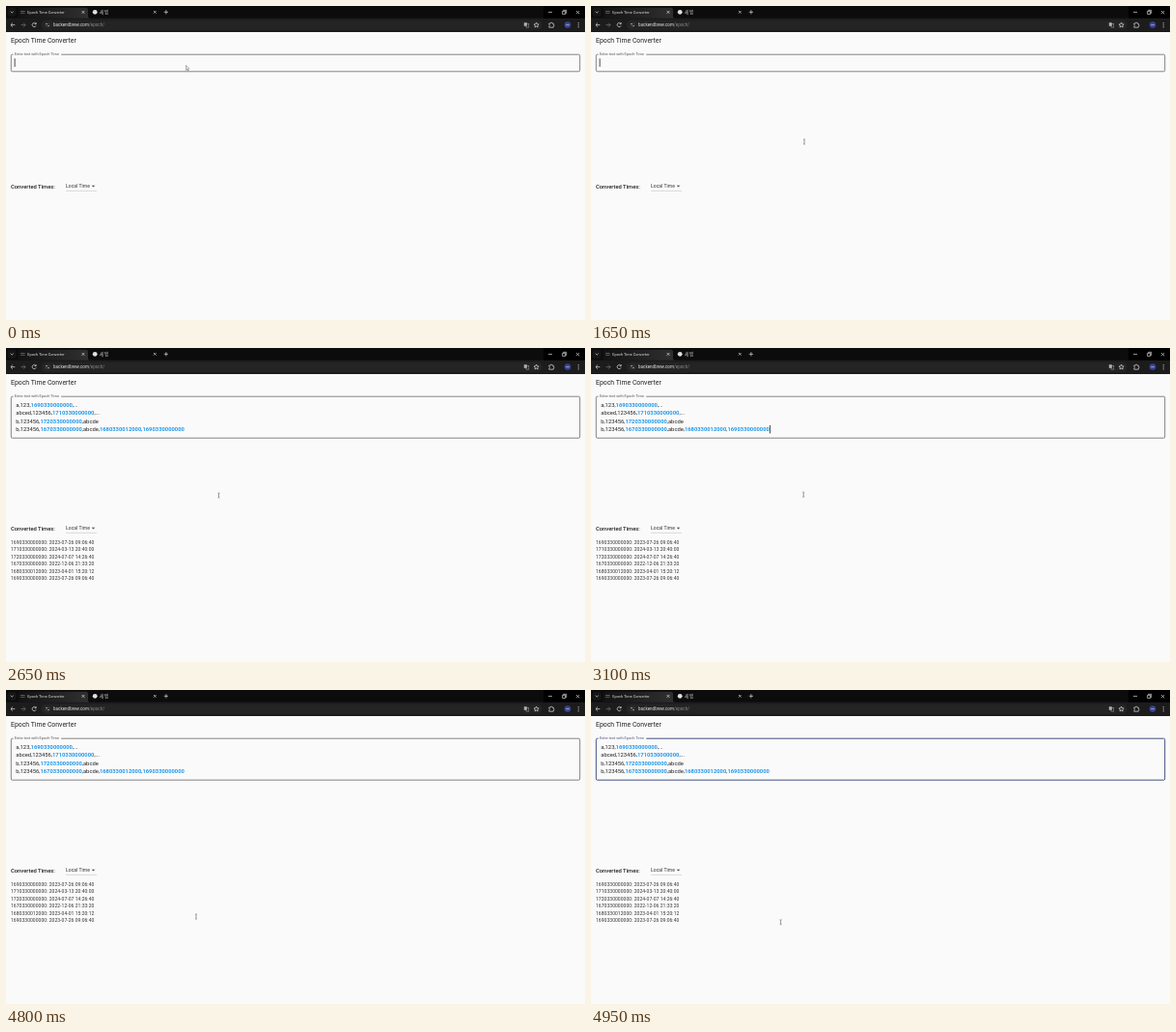
Recreate the animation shown at these times as an HTML page. Size 600x325 px, loop 5000 ms.

```html
<!DOCTYPE html>
<html lang="en">
<head>
<meta charset="utf-8">
<title>Epoch Time Converter</title>
<style>
html, body { margin: 0; width: 100%; height: 100%; overflow: hidden; background: #fbfafa; }
svg { display: block; width: 600px; height: 325px; }
text { font-family: Roboto, "Noto Sans CJK KR", "Noto Sans CJK", sans-serif; fill: #222; white-space: pre; }
.icon { fill: none; stroke: #ddd; stroke-width: .7; }
.dim { stroke: #777; }
.bar text { fill: #e4e4e4; }
.body { font-size: 5px; letter-spacing: .047px; fill: #333; }
.input { font-size: 5.82px; }
.input tspan { font-weight: 700; fill: #2098ec; }
</style>
</head>
<body>
<svg viewBox="0 0 600 325">
  <defs>
    <linearGradient id="tab"><stop stop-color="#121212"/><stop offset="1" stop-color="#303030"/></linearGradient>
  </defs>
  <rect width="600" height="325" fill="#fbfafa"/>

  <g class="bar">
    <rect width="600" height="27" fill="#1c1c1c"/>
    <rect width="600" height="12.6" fill="#0c0c0c"/>
    <rect x="557" width="43" height="12.6" fill="#000"/>
    <rect x="1.5" y="1.8" width="9" height="9" rx="2.5" fill="#161616"/>
    <path d="M11 12.8Q12.5 12.6 12.5 10.5V4Q12.5 1.8 15 1.8H82.5Q85 1.8 85 4V10.5Q85 12.6 86.5 12.8Z" fill="url(#tab)"/>
    <rect x="36.5" y="14.4" width="519" height="10.4" rx="5.2" fill="#242424"/>
    <path class="icon" d="M4.7 5.7L6.2 7.1L7.7 5.7M78.6 5L81.4 7.8M81.4 5L78.6 7.8M153 5L155.6 7.6M155.6 5L153 7.6M163.8 6.3H168M165.9 4.2V8.4"/>
    <path class="icon dim" d="M15 5.5H19.6M15 7.3H19.6"/>
    <circle cx="92.2" cy="6.3" r="2.4" fill="#e0e0e0"/>
    <text x="22.3" y="7.9" font-size="3.9">Epoch Time Converter</text>
    <text x="97" y="7.9" font-size="4.2">새 탭</text>
    <path class="icon" d="M562 6.4H566M576.6 5.4H579.6V8.4H576.6ZM577.7 5.2V4.3H580.7V7.3H579.8M591 5L594.2 8.2M594.2 5L591 8.2"/>

    <path class="icon" d="M9.3 19.6H5M7 17.5L4.9 19.6L7 21.7M31 18.4A2.1 2.1 0 1 0 31.2 20.3M31.2 17V18.7H29.5"/>
    <path class="icon dim" d="M15.6 19.6H20M18 17.5L20.1 19.6L18 21.7"/>
    <circle cx="43" cy="19.6" r="3.4" fill="#2a2a2a"/>
    <path class="icon" d="M41.2 18.6H43M44.6 18.6H44.8M41.2 20.6H41.5M43.1 20.6H44.8"/>
    <text x="49" y="21.2" font-size="4.55">backendbrew.com<tspan fill="#8a8a8a">/epoch/</tspan></text>
    <rect x="536.8" y="17.2" width="3" height="3.6" fill="#b0b0b0"/>
    <rect x="539" y="18.7" width="2.8" height="3.4" fill="none" stroke="#aaa" stroke-width=".5"/>
    <path class="icon" stroke-linejoin="round" d="M549.6 17L550.4 18.8L552.2 19L550.8 20.2L551.2 22L549.6 21L548 22L548.4 20.2L547 19L548.8 18.8Z"/>
    <path class="icon" d="M562.8 18H564.2A.9 .9 0 0 1 566 18H567.2V19.2A.9 .9 0 0 1 567.2 21V22.2H562.8V20.9A.9 .9 0 0 0 562.8 19.2Z"/>
    <circle cx="582" cy="19.6" r="3.3" fill="#3a4494"/>
    <path d="M580.2 19.6H583.8" stroke="#a5aad8" stroke-width=".9"/>
    <path d="M593.2 17.2V22.4" stroke="#ddd" stroke-width="1" stroke-dasharray="1 1.1"/>
  </g>

  <text x="5" y="38.2" font-size="6.9">Epoch Time Converter</text>
  <rect id="field" x="5.3" y="50.2" width="589.4" rx="1.3" fill="none"/>
  <rect x="7.6" y="48" width="49.6" height="3.6" fill="#fbfafa"/>
  <text id="label" x="8.8" y="51.1" font-size="3.9">Enter text with Epoch Time</text>

  <text x="5" y="188.5" font-size="5.82" font-weight="500">Converted Times:</text>
  <text class="body" x="62" y="188.4">Local Time</text>
  <path d="M88.7 185.8H92.3L90.5 187.6Z" fill="#444"/>
  <path d="M62 191.4H94" stroke="#aaa" stroke-width=".4"/>

  <g id="filled"></g>
  <rect id="caret" fill="#222"/>
  <path id="arrow" d="M186.6 61.5V66.4L187.6 65.4L188.4 67L189.1 66.7L188.4 65.1H189.8Z" fill="#fff" stroke="#444" stroke-width=".45"/>
  <path id="beam" d="M-1 -2.5Q-.2 -2.5 0 -2.1Q.2 -2.5 1 -2.5M0 -2.1V2.1M-1 2.5Q-.2 2.5 0 2.1Q.2 2.5 1 2.5" fill="none" stroke="#444" stroke-width=".55"/>
</svg>
<script>
const $ = id => document.getElementById(id);
const show = (id, on) => $(id).setAttribute("visibility", on ? "visible" : "hidden");
const set = (id, attrs) => { for (const k in attrs) $(id).setAttribute(k, attrs[k]); };

const input = [
  "a,123,1690330000000,...",
  "abced,123456,1710330000000,...",
  "b,123456,1720330000000,abcde",
  "b,123456,1670330000000,abcde,1680330012000,1690330000000"
];
const pad = n => String(n).padStart(2, "0");
const local = ms => {
  const d = new Date(ms + 9 * 3600e3); // UTC+9
  return d.toISOString().slice(0, 10) + " " +
    [d.getUTCHours(), d.getUTCMinutes(), d.getUTCSeconds()].map(pad).join(":");
};
const stamps = input.join().match(/\d{13}/g);
$("filled").innerHTML =
  input.map((s, i) => `<text class="input" x="10.3" y="${60.9 + i * 8.45}">${s.replace(/\d{13}/g, "<tspan>$&</tspan>")}</text>`).join("") +
  stamps.map((s, i) => `<text class="body" x="5" y="${202.6 + i * 7.53}">${s}: ${local(+s)}</text>`).join("");

const pasteAt = 2000;
const blinks = [100, 700, 1100, 1600, 2500, 3050, 3500, 4000, 4500];
// time, x, y of the pointer
const path = [
  [1050, 187, 63], [1150, 221, 140.5], [2400, 221, 140.5], [2600, 220.5, 152.5],
  [3000, 220.5, 152.5], [3100, 220.2, 151.7], [4600, 220.2, 151.7],
  [4800, 197, 234.5], [4950, 196.6, 240.3], [5000, 196.6, 240.3]
];

function pointer(t) {
  const i = Math.max(1, path.findIndex(p => p[0] >= t));
  const [a, b] = [path[i - 1], path[i]];
  const k = Math.max(0, (t - a[0]) / (b[0] - a[0]));
  return [1, 2].map(j => a[j] + (b[j] - a[j]) * k);
}

function draw(now) {
  const t = Math.floor(now % 5000 / 50) * 50;
  const filled = t >= pasteAt, focus = t >= 4900;
  show("filled", filled);
  set("field", {
    height: filled ? 43 : 17.6,
    stroke: focus ? "#42507f" : "#505050",
    "stroke-width": focus ? 1 : .7
  });
  $("label").style.fill = focus ? "#4a5685" : "#555";
  show("caret", blinks.filter(b => b <= t).length % 2 === 0);
  set("caret", filled
    ? { x: 185.1, y: 80, width: .8, height: 8.4 }
    : { x: 8.7, y: 54.3, width: .8, height: 8.6 });
  show("arrow", t < 1100);
  show("beam", t >= 1100);
  set("beam", { transform: `translate(${pointer(t)})` });
  requestAnimationFrame(() => draw(performance.now() - start));
}
const start = performance.now();
draw(0);
</script>
</body>
</html>
```
